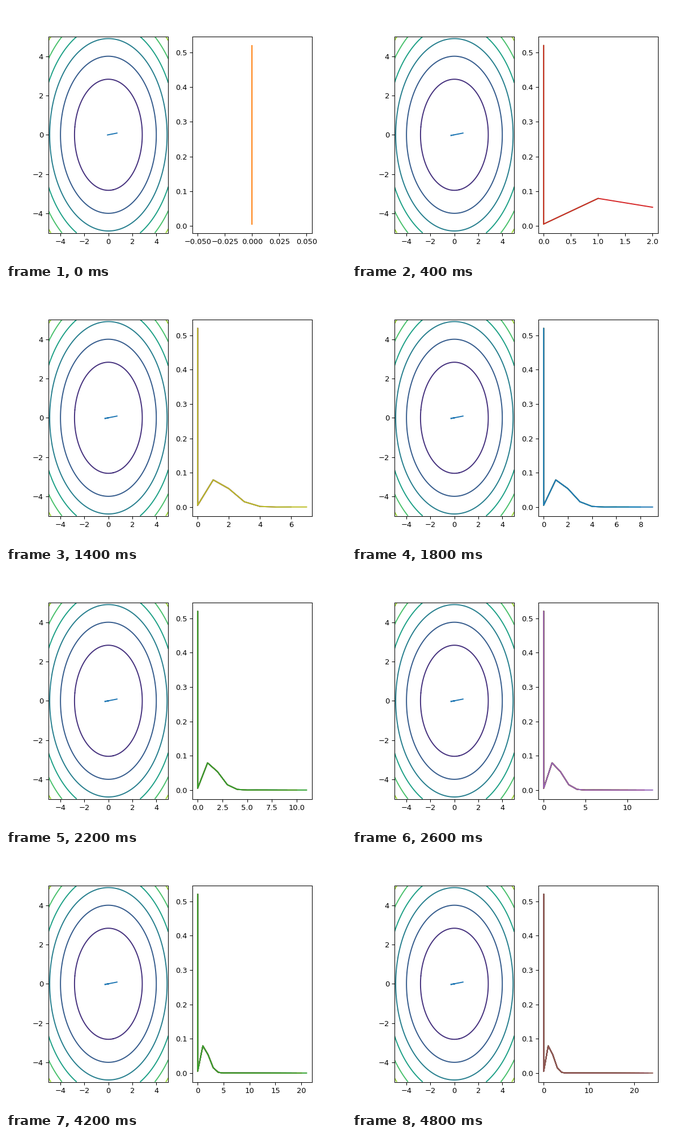
A matplotlib script that plays this animation: 600 px wide and 450 px high, repeating every 5000 ms.

```python
import numpy as np
import matplotlib.pyplot as plt
from matplotlib.animation import FuncAnimation

FRAMES = 25
INTERVAL = 200
MOMENTUM = 0.3
STEP = 0.4
START = np.array([0.716, 0.086])


def descend(start, steps):
    """Momentum descent on x^2 + y^2, entered with some initial speed."""
    points = [start]
    velocity = -7 / 3 * start
    for _ in range(steps):
        velocity = MOMENTUM * velocity - STEP * points[-1]
        points.append(points[-1] + velocity)
    return np.array(points)


path = descend(START, FRAMES)
losses = (path ** 2).sum(axis=1)
# The opening step is counted twice.
times = np.maximum(np.arange(FRAMES + 1) - 1, 0)

fig, (ax_path, ax_loss) = plt.subplots(1, 2, figsize=(6.4, 4.8), dpi=93.75)

grid = np.linspace(-5, 5, 201)
gx, gy = np.meshgrid(grid, grid)
ax_path.contour(gx, gy, gx ** 2 + gy ** 2, levels=np.arange(0, 57, 8))
ax_path.set(xlim=(-5, 5), ylim=(-5, 5))
segments = [
    ax_path.plot(*path[k:k + 2].T, color="C0")[0] for k in range(FRAMES)
]


def update(frame):
    for k, segment in enumerate(segments):
        segment.set_visible(k <= frame)

    # Every earlier curve stays underneath the newest one.
    ax_loss.clear()
    for k in range(frame + 2):
        ax_loss.plot(times[:k + 1], losses[:k + 1], color=f"C{k % 10}")
    return []


anim = FuncAnimation(fig, update, frames=FRAMES, interval=INTERVAL,
                     init_func=lambda: update(0), repeat=True, repeat_delay=0)
plt.show()
```
